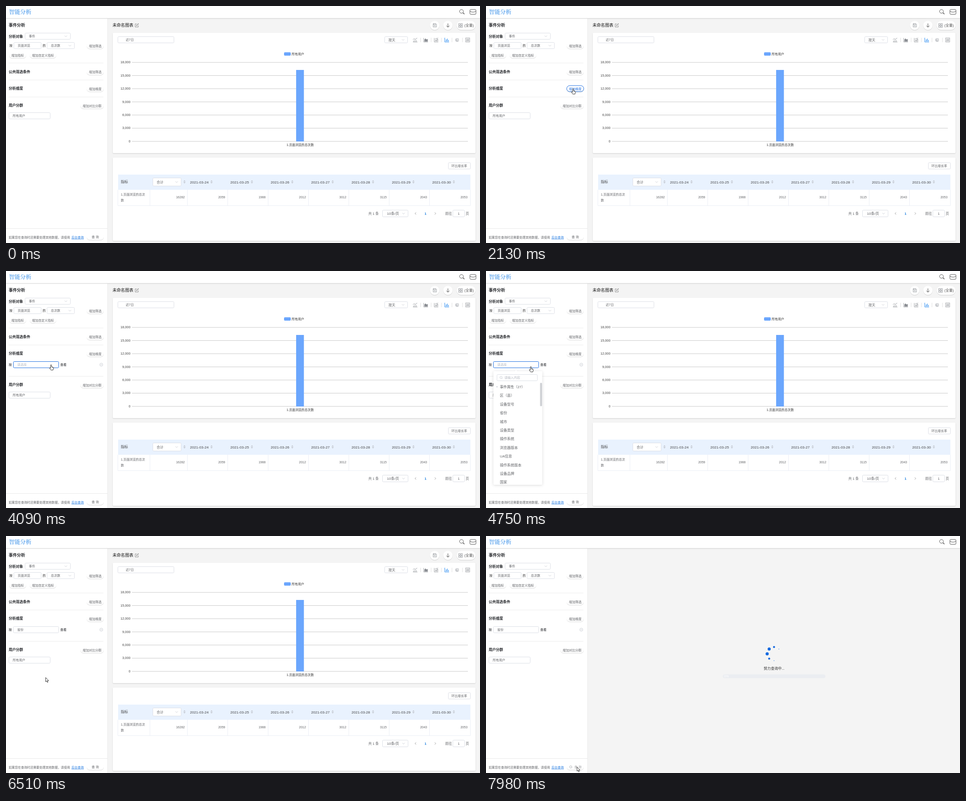
An HTML page that plays this animation: 1057 px wide and 530 px high, repeating every 8000 ms.

```html
<!DOCTYPE html>
<html lang="zh-CN">
<head>
<meta charset="utf-8">
<title>事件分析</title>
<style>
html, body { margin: 0; width: 100%; height: 100%; overflow: hidden; background: #fff; }
svg { display: block; width: 1057px; height: 530px; }
text { font-family: "Liberation Sans", "Noto Sans CJK SC", "Noto Sans CJK", sans-serif; white-space: pre; }
.brand { font-family: "Noto Serif CJK SC", "Noto Sans CJK SC", "Noto Sans CJK", serif; }
.pill { filter: drop-shadow(0 1px .7px rgba(0,0,0,.15)); }
.card { filter: drop-shadow(0 1px 1.3px rgba(0,0,0,.15)); }
.pop { filter: drop-shadow(0 1px 3px rgba(0,0,0,.14)); }
</style>
</head>
<body>
<svg id="stage" viewBox="0 0 1057 530"></svg>
<script>
const BLUE = '#1f6fe0', BAR = '#6ba6fd', INK = '#606266', DARK = '#222428',
      LINE = '#dcdfe6', PALE = '#c0c4cc', ICON = '#8a8d92', LOOP = 8000;
const stage = document.getElementById('stage');
let layer = stage;

function add(tag, attrs, parent = layer) {
  const el = document.createElementNS('http://www.w3.org/2000/svg', tag);
  set(el, attrs);
  return parent.appendChild(el);
}
function set(el, attrs) {
  for (const k in attrs) el.setAttribute(k, attrs[k]);
}
function group(draw, attrs = {}) {
  const outer = layer, g = add('g', attrs);
  layer = g;
  draw();
  layer = outer;
  return g;
}
function rect(x, y, w, h, fill, more = {}) {
  return add('rect', { x, y, width: w, height: h, fill, ...more });
}
function path(d, stroke = ICON, more = {}) {
  return add('path', { d, fill: 'none', stroke, 'stroke-width': 1, ...more });
}
function circle(cx, cy, r, more = {}) {
  return add('circle', { cx, cy, r, fill: 'none', ...more });
}
// y is the vertical middle of the line of text
function label(str, x, y, size = 7, fill = INK, more = {}) {
  const el = add('text', { x, y: y + size * .37, 'font-size': size, fill, ...more });
  el.textContent = str;
  return el;
}
const bold = (str, x, y, size = 8) => label(str, x, y, size, DARK, { 'font-weight': 700 });
const end = { 'text-anchor': 'end' }, mid = { 'text-anchor': 'middle' };
const thin = { 'stroke-width': .8 };
const hline = (x1, x2, y, color = '#ededed') => path(`M${x1} ${y}H${x2}`, color);
const chevron = (x, y) => path(`M${x - 2.7} ${y - 1.3}l2.7 2.7 2.7-2.7`, PALE, thin);

function field(x, y, w, str, { size = 7, pad = 8.5, color = INK, drop = false, h = 14 } = {}) {
  const box = rect(x, y, w, h, '#fff', { rx: 2, stroke: LINE });
  const text = label(str, x + pad, y + h / 2 + .4, size, color);
  if (drop) chevron(x + w - 10, y + h / 2);
  return { box, text };
}
function pill(x, y, w, str, h = 13.5) {
  const box = rect(x, y, w, h, '#fff', { rx: h / 2, class: 'pill' });
  const text = label(str, x + w / 2, y + h / 2 + .3, 7, INK, mid);
  return { box, text };
}
function light(btn, on) {
  set(btn.box, { stroke: on ? BLUE : 'none' });
  set(btn.text, { fill: on ? BLUE : INK });
}

// right side
rect(0, 0, 1057, 530, '#f4f4f4');
const report = group(() => {
  label('未命名图表', 237.5, 43, 9.3, '#111', { 'font-weight': 500 });
  path('M291.5 40h-3.5v7h7v-3.5M290.5 44.5l.4-1.5 4-4 1 1-4 4z', '#777', thin);

  for (const x of [956, 985.5]) circle(x, 43.5, 10.3, { fill: '#fff', class: 'pill' });
  rect(1005, 33.5, 42, 20, '#fff', { rx: 10, class: 'pill' });
  path('M952.5 39.5h6l1.5 1.5v6h-7.5zM954 39.5v2.5h4v-2.5M954 44.5h4.5', ICON, thin);
  path('M985.5 39v8M982 44l3.5 3.5 3.5-3.5', '#555');
  for (const x of [1009.5, 1014.5]) for (const y of [39.5, 44.5])
    rect(x, y, 3.4, 3.4, 'none', { stroke: ICON, ...thin });
  label('(全量)', 1022, 43.5, 8, '#555');

  rect(238, 60, 809, 269, '#fff', { rx: 2, class: 'card' });
  rect(238, 339, 809, 186, '#fff', { rx: 2, class: 'card' });

  field(249.5, 68.5, 125, '近7日', { pad: 17.5 });
  field(844.5, 68.5, 51, '按天', { size: 7.5, drop: true });
  for (const x of [924.5, 948, 971, 994.5, 1018]) path(`M${x} 71v10`, '#e0e0e0');
  path('M907.5 80.5h10M909 80v-3M912 80v-5M915 80v-4M907.5 75l3-2 2 1.5 4.5-3', ICON, thin);
  path('M933 79.5v-4.5l2.5-2.5 2.5 2.5 2.5-1.5v6z', 'none', { fill: ICON });
  path('M931.5 71.5v9h9.5', ICON, thin);
  path('M955 71.5v9h9M957.5 79v-3h2v3M961 79v-5h2v5M957 74l2-2 2 1 2.5-2', ICON, thin);
  path('M978.5 71v9.5h9.5', '#2b8cf0');
  path('M981.5 79v-4M984 79v-6M986.5 79v-3', '#2b8cf0', { 'stroke-width': 1.2 });
  circle(1006, 76, 4.3, { fill: '#c9cbcf' });
  path('M1006 71.5v4.5h4.5', '#fff');
  rect(1025, 71.5, 9, 9, 'none', { stroke: ICON, ...thin });
  path('M1028.5 73l-1 6M1031.5 73l-1 6M1026.5 75h6.5M1026.5 77.5h6.5', ICON, { 'stroke-width': .7 });

  rect(620, 103.5, 15, 7.5, BAR, { rx: 2 });
  label('所有用户', 637, 107, 7, '#333');
  for (let i = 0; i < 7; i++) {
    const y = 302.7 - i * 29.43;
    hline(281, 1030, y, '#c8c8c8');
    label((i * 3000).toLocaleString('en-US'), 277.5, y - .6, 7.3, '#444', end);
  }
  rect(647, 143, 17.3, 160, BAR);
  label('1.页面浏览的总次数', 656, 310, 6.85, '#333', mid);

  rect(986.5, 350.5, 49, 14, '#fff', { stroke: LINE, rx: 1 });
  label('环比增长率', 1010.8, 357.8, 7, INK, mid);

  rect(250, 377, 785.5, 34, '#e9f2fe');
  path('M249.5 411V446.5H1035.5V411', '#ebeef5');
  label('指标', 256, 393.5, 8, '#444');
  field(327.5, 384.5, 63, '合计', { size: 7.5, drop: true, h: 18 });
  label('1.页面浏览的总次', 256, 421.5, 6.9);
  label('数', 256, 434.5, 6.9);
  [16282, 2059, 1988, 2012, 3012, 3115, 2043, 2053].forEach((n, i) => {
    const dx = i * 90.05, sx = i ? 368.3 + dx : 398;
    label(String(n), 398.7 + dx, 427.8, 7, INK, end);
    if (i) label('2021-03-' + (23 + i), 320.2 + dx, 394, 8.1, '#444');
    path(`M${sx - 2.5} 392.5l2.5-2.8 2.5 2.8zM${sx - 2.5} 394l2.5 2.8 2.5-2.8z`, 'none', { fill: PALE });
    path(`M${i ? Math.round(314 + dx) + .5 : 321} 411V446`, '#ebeef5');
  });

  label('共 1 条', 808, 464, 7.5);
  field(839.5, 456.5, 57, '10条/页', { size: 8, pad: 10, drop: true, h: 15 });
  path('M914.5 461.5l-2.5 2.5 2.5 2.5M956 461.5l2.5 2.5-2.5 2.5', '#888', thin);
  label('1', 935.5, 464, 7.8, '#1f80e0', { ...mid, 'font-weight': 700 });
  label('前往', 979.5, 464.5, 7.5);
  field(996.5, 456.5, 26, '1', { size: 7.5, pad: 11, h: 15 });
  label('页', 1025, 464.5, 7.5);
});

let dots;
const loading = group(() => {
  dots = Array.from({ length: 8 }, (_, i) => {
    const a = i * Math.PI / 4;
    return circle(642.3 + 15.3 * Math.cos(a), 263.5 + 15.3 * Math.sin(a), 1, { fill: '#176ae0' });
  });
  label('努力查询中...', 642.5, 296, 8, '#333', mid);
  rect(528, 309.5, 229, 8.5, '#ebedf1', { rx: 4.25 });
  label('0%', 531, 313.8, 7, '#fff');
});

// header and sidebar
rect(0, 28, 226.5, 502, '#fff');
path('M226.5 28V530', '#ececec');
rect(0, 0, 1057, 27, '#fff', { class: 'card' });
label('智能分析', 6.5, 13, 12.5, '#69abee', { class: 'brand', 'font-weight': 700 });
circle(1015.7, 12, 4.2, { stroke: '#555' });
path('M1019 15l3.2 3.3', '#555', { 'stroke-width': 1.6 });
rect(1034.5, 7.8, 13.5, 10.8, 'none', { rx: 2, stroke: '#555' });
path('M1034.5 11.5q6.7 4.5 13.5 0', '#555');

bold('事件分析', 6, 42.5, 9.2);
bold('分析对象', 6, 68);
field(42.5, 60.5, 101, '事件', { drop: true });
label('按', 7.5, 88.5, 7, '#333');
field(17.5, 81.5, 61, '页面浏览');
label('的', 81.5, 88.5, 7, '#333');
field(91.5, 81.5, 61, '总次数', { drop: true });
pill(180, 82, 38, '增加筛选');
pill(7, 103, 38, '增加指标');
pill(53, 103, 59, '增加自定义指标');
hline(6, 217, 127.5);
bold('公共筛选条件', 6, 147);
pill(180, 140.5, 38, '增加筛选');
hline(6, 217, 165.5);
bold('分析维度', 6, 184.5);
const addDim = pill(180, 178, 38, '增加维度');

let dimField;
const dimRow = group(() => {
  const dark = { 'font-weight': 500 };
  label('按', 6, 209.5, 7, DARK, dark);
  dimField = field(16.5, 202.5, 101, '请选择');
  label('查看', 121, 209.5, 7, DARK, dark);
  circle(212.5, 209.5, 3.4, { stroke: PALE, ...thin });
  path('M210.8 209.5h3.4', PALE, thin);
});
const users = group(() => {
  hline(6, 217, 203.5);
  bold('用户分群', 6, 222);
  pill(166, 216, 52, '增加对比分群');
  field(6.5, 238.5, 92, '所有用户');
});

hline(0, 226, 497.5, '#e8e8e8');
label('如果您在查询时还需要处理其他数据，请使用', 6, 517.3, 6.85);
label('后台查询', 146, 517.3, 6.85, '#1f78e0', { 'text-decoration': 'underline' });
const query = pill(180, 509.5, 38, '查 询');
const busy = circle(189, 516.4, 2.4, { stroke: '#a5a8ad', 'stroke-width': 1.4, 'stroke-dasharray': '1.1 .78' });

// dropdown
const ROW = 19.4, TOP = 249.4;
let hover;
const menu = group(() => {
  group(() => {
    rect(16.5, 224, 109, 254, '#fff', { rx: 2 });
    path('M64 224.5l3-3 3 3z', 'none', { fill: '#fff' });
  }, { class: 'pop' });
  field(24.5, 231.5, 90, '请输入内容', { pad: 16.5, color: '#b4b8c0' });
  circle(33.5, 238, 2.5, { stroke: PALE, ...thin });
  path('M35.3 240l1.5 1.5', PALE, thin);
  hover = rect(17, 0, 103, ROW, '#f4f6f9');
  path('M22.5 258.3h4l-2 2.3z', 'none', { fill: PALE });
  ['事件属性（27）', '区（县）', '设备型号', '省份', '城市', '设备类型', '操作系统', '浏览器版本',
   'UA信息', '操作系统版本', '设备品牌', '国家'].forEach((s, i) =>
    label(s, 31, TOP + ROW * (i + .5) - .1, i ? 8 : 7.85));
  rect(120.5, 250, 4.5, 52.5, '#cfd1d5', { rx: 2.2 });
});

// pointer
const spot = circle(0, 0, 6.7, { fill: '#f5ee35', opacity: .85 });
const ink = { fill: '#fff', 'stroke-width': .9, 'stroke-linejoin': 'round' };
const arrow = path('M0 0V9.5L2.2 7.5 3.7 11 5.2 10.3 3.7 7H6.6Z', '#222', ink);
const hand = group(() => {
  path('M-1 1.6Q0 0 1 1.6V5.6L4.5 6.6Q5.6 7 5.4 8.6L4.5 13H-.5L-3.4 8.9Q-3.6 7.3-2.3 7.8L-1 9Z', '#222', ink);
  path('M2.5 6v2M4 6.5v1.5', '#222', { 'stroke-width': .6 });
});

// time, x, y
const MOVES = [
  [400, 1054, 526], [1190, 126, 221], [1280, 127, 210], [2010, 194, 184], [2130, 194, 184],
  [2300, 192, 186], [3180, 192, 186], [3580, 100.5, 208.5], [4690, 100.5, 208.5],
  [5200, 88.5, 316.5], [6510, 88.5, 316.5], [7290, 203, 518], [7600, 203, 518], [7610, 203, 516.5]
];
const HANDS = [[1790, 3280], [3465, 6200], [7200, 7610]];
const CLICKS = [[2450, 2710], [3750, 4000], [5560, 5690], [7320, 7600]];

const within = (t, spans) => spans.some(([a, b]) => t >= a && t < b);
const ramp = (t, a, b) => Math.min(1, Math.max(0, (t - a) / (b - a)));
const show = (el, on) => { el.style.display = on ? '' : 'none'; };

function pointer(t) {
  const i = MOVES.findIndex(m => m[0] > t);
  if (i < 0) return MOVES[MOVES.length - 1].slice(1);
  if (!i) return MOVES[0].slice(1);
  const [a, x0, y0] = MOVES[i - 1], [b, x1, y1] = MOVES[i];
  const u = ramp(t, a, b), s = u * u * (3 - 2 * u);
  return [x0 + (x1 - x0) * s, y0 + (y1 - y0) * s];
}

function render(t) {
  const [x, y] = pointer(t), at = { transform: `translate(${x} ${y})` };
  const isHand = within(t, HANDS), wait = t >= 7610;
  for (const el of [arrow, hand, spot]) set(el, at);
  show(arrow, t >= 400 && !isHand);
  show(hand, isHand);
  show(spot, within(t, CLICKS));

  const open = t >= 2710, chosen = t >= 6000;
  show(dimRow, open);
  set(users, { transform: `translate(0 ${open ? 32 : 0})` });
  light(addDim, t >= 1790 && t < 3780);
  set(dimField.box, { stroke: t >= 3780 && t < 5620 ? BLUE : LINE });
  dimField.text.textContent = chosen ? '省份' : '请选择';
  set(dimField.text, { fill: chosen ? INK : '#b4b8c0' });

  const fade = ramp(t, 4270, 4500) * (1 - ramp(t, 5980, 6260));
  show(menu, fade > 0);
  set(menu, { opacity: fade });
  const row = Math.floor((y - TOP) / ROW);
  show(hover, row >= 0);
  set(hover, { y: TOP + row * ROW });

  light(query, t >= 7200 && !wait);
  set(query.text, { x: wait ? 205 : 199, opacity: wait ? .6 : 1 });
  show(busy, wait);
  set(busy, { transform: `rotate(${(t - 7980) * .18} 189 516.4)` });
  show(report, !wait);
  show(loading, wait);
  const peak = 3.53 + (t - 7980) / 1200 * 2 * Math.PI;
  dots.forEach((d, i) =>
    set(d, { r: 3.7 * Math.pow(.5 + .5 * Math.cos(i * Math.PI / 4 - peak), 1.4) }));
}

const start = performance.now();
function tick() {
  render((performance.now() - start) % LOOP);
  requestAnimationFrame(tick);
}
tick();
</script>
</body>
</html>
```
